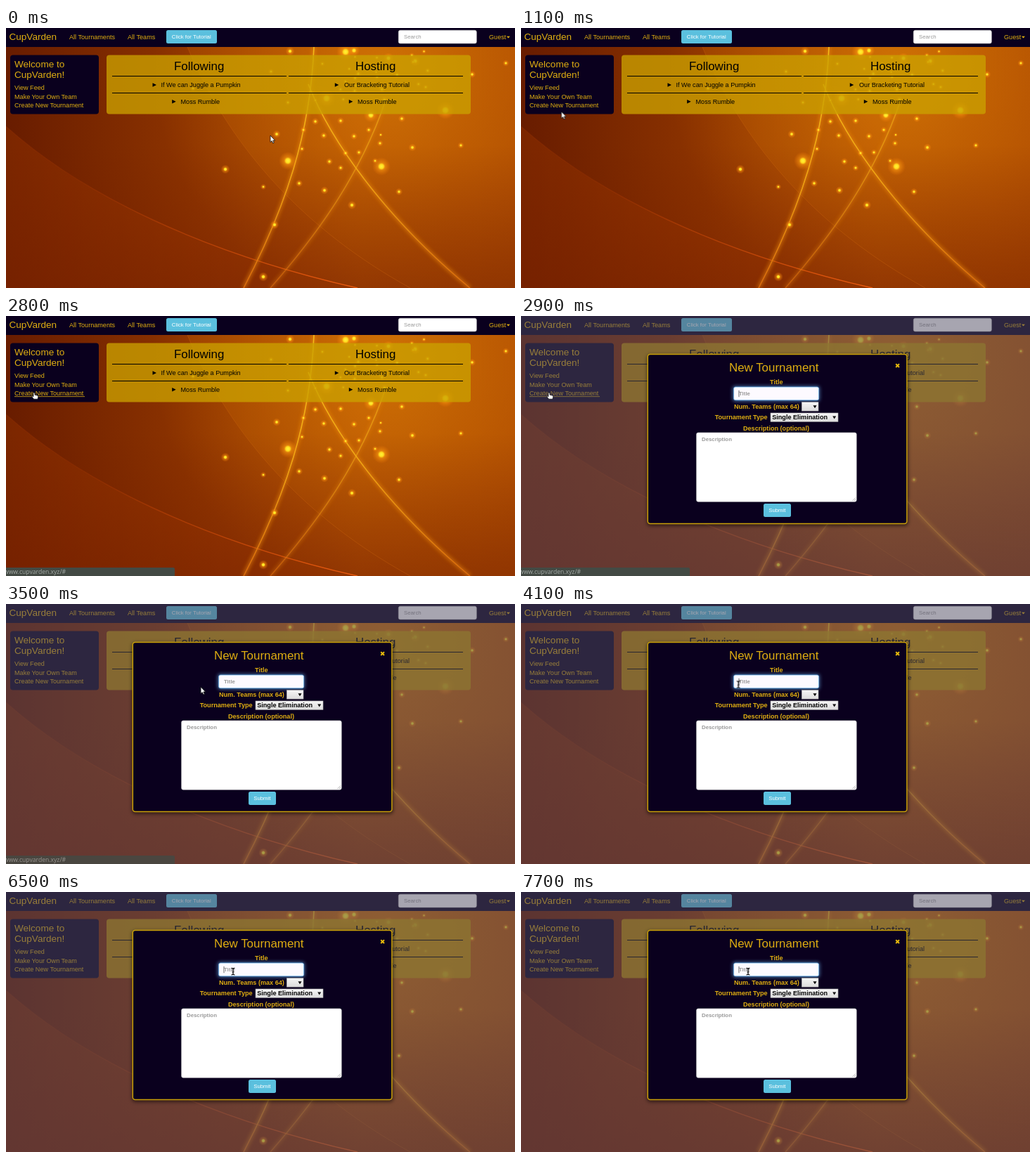
Recreate the animation shown at these times as an HTML page. Size 724x370 px, loop 8000 ms.

```html
<!DOCTYPE html>
<html lang="en">
<head>
<meta charset="utf-8">
<title>Tournament page</title>
<style>
html, body { margin: 0; width: 100%; height: 100%; overflow: hidden; background: #0a001e; }
svg { display: block; width: 724px; height: 370px; }
text { font: 9.1px "Liberation Sans", Arial, sans-serif; white-space: pre; }
.gold { fill: #dfae12; }
.navy { fill: #0a001e; }
.brand { font-size: 13.55px; }
.head { font-size: 16.9px; }
.small { font-size: 7.8px; }
.bold text { font-weight: bold; }
.hint { fill: #999; }
.white { fill: #fff; }
.url { font: 8.6px "Open Sans", "Noto Sans", sans-serif; fill: #a6aca8; }

.anim { animation: 8s -20ms infinite step-end; }
#cursor { animation: travel 8s -20ms infinite ease-in-out; }
#arrow { animation-name: arrow; }
#hand, #underline { animation-name: hover; }
#beam { animation-name: beam; }
#status { animation-name: status; }
#modal { animation-name: modal; }
#caret { animation-name: caret; }

@keyframes travel {
  0%, 1.25% { transform: translate(376px, 153px); }
  13.75% { transform: translate(57.5px, 119px); }
  23.75%, 36.5% { transform: translate(40px, 109px); }
  43.75% { transform: translate(277px, 118px); }
  56.25%, 100% { transform: translate(323px, 113px); }
}
@keyframes arrow {
  0% { visibility: visible; }
  17.5% { visibility: hidden; }
  37.5% { visibility: visible; }
  50% { visibility: hidden; }
}
@keyframes hover {
  0% { visibility: hidden; }
  17.5% { visibility: visible; }
  37.5% { visibility: hidden; }
}
@keyframes beam {
  0% { visibility: hidden; }
  50% { visibility: visible; }
}
@keyframes status {
  0% { opacity: 0; }
  18.75% { opacity: 1; }
  43.75% { opacity: .8; }
  45% { opacity: 0; }
}
@keyframes modal {
  0% { visibility: hidden; }
  36.25% { visibility: visible; }
}
/* blinks every 600 ms once the field has focus */
@keyframes caret {
  0% { opacity: 0; }
  36.25% { opacity: 1; }
  43.75% { opacity: 0; }
  51.25% { opacity: 1; }
  58.75% { opacity: 0; }
  66.25% { opacity: 1; }
  73.75% { opacity: 0; }
  81.25% { opacity: 1; }
  88.75% { opacity: 0; }
  96.25% { opacity: 1; }
}
</style>
</head>
<body>
<svg viewBox="0 0 724 370">
  <defs>
    <linearGradient id="base">
      <stop offset="0" stop-color="#681c00"/>
      <stop offset=".35" stop-color="#8c3300"/>
      <stop offset=".7" stop-color="#b35004"/>
      <stop offset="1" stop-color="#ac4803"/>
    </linearGradient>
    <radialGradient id="warm" gradientUnits="userSpaceOnUse" cx="540" cy="60" r="330">
      <stop offset="0" stop-color="#dc8206" stop-opacity=".65"/>
      <stop offset="1" stop-color="#c86400" stop-opacity="0"/>
    </radialGradient>
    <linearGradient id="shade" x1="0" y1="0" x2="0" y2="1">
      <stop offset=".45" stop-color="#701c00" stop-opacity="0"/>
      <stop offset="1" stop-color="#701c00" stop-opacity=".5"/>
    </linearGradient>
    <linearGradient id="beamLine" gradientUnits="userSpaceOnUse" x1="0" y1="27" x2="0" y2="370">
      <stop offset="0" stop-color="#f4bc18"/>
      <stop offset=".5" stop-color="#f0a814"/>
      <stop offset="1" stop-color="#d86a0c"/>
    </linearGradient>
    <linearGradient id="rim" gradientUnits="userSpaceOnUse" x1="0" y1="0" x2="500" y2="0">
      <stop offset=".2" stop-color="#d04808" stop-opacity=".1"/>
      <stop offset="1" stop-color="#ec5c10"/>
    </linearGradient>
    <radialGradient id="spark">
      <stop offset="0" stop-color="#fff23c"/>
      <stop offset=".24" stop-color="#ffdc1e"/>
      <stop offset=".42" stop-color="#ff9c10" stop-opacity=".55"/>
      <stop offset="1" stop-color="#ff8008" stop-opacity="0"/>
    </radialGradient>
    <linearGradient id="select" x1="0" y1="0" x2="0" y2="1">
      <stop offset="0" stop-color="#f6f6f6"/>
      <stop offset="1" stop-color="#dcdcdc"/>
    </linearGradient>
    <filter id="blur" x="-20%" y="-20%" width="140%" height="140%"><feGaussianBlur stdDeviation="2.5"/></filter>
    <g id="streaks">
      <path d="M438 27C433 150 398 255 338 370"/>
      <path d="M430 80C468 176 556 284 660 370"/>
      <path d="M541 100C506 205 446 290 376 370" opacity=".6"/>
    </g>
  </defs>

  <g id="backdrop">
    <rect width="724" height="370" fill="url(#base)"/>
    <path d="M0 140C110 238 280 320 500 370H0Z" fill="#a43c00" opacity=".32"/>
    <path d="M258 27C320 175 430 290 575 370H724V27Z" fill="#c06200" opacity=".25"/>
    <rect width="724" height="370" fill="url(#warm)"/>
    <path d="M430 80C468 176 556 284 660 370H376C446 290 506 205 541 100Z" fill="#d07808" opacity=".08"/>
    <rect width="724" height="370" fill="url(#shade)"/>
    <g fill="none">
      <path d="M0 140C110 238 280 320 500 370" stroke="url(#rim)" stroke-width="1.4"/>
      <path d="M258 27C320 175 430 290 575 370" stroke="#d46c10" stroke-width=".8" opacity=".4"/>
      <use href="#streaks" stroke="#f08c10" stroke-width="6" opacity=".45" filter="url(#blur)"/>
      <use href="#streaks" stroke="url(#beamLine)" stroke-width="1.6"/>
    </g>
    <g id="sparks" fill="url(#spark)"></g>
  </g>

  <rect class="navy" width="724" height="27"/>
  <g class="gold">
    <text class="brand" x="4.5" y="17">CupVarden</text>
    <text x="90" y="15.5">All Tournaments</text>
    <text x="173" y="15.5">All Teams</text>
    <text x="687" y="15.5">Guest</text>
    <path d="M712 11.8h5l-2.5 2.7Z"/>
  </g>
  <rect x="228" y="3" width="72" height="19" rx="2.5" fill="#5bc0de"/>
  <text class="small white" x="235.8" y="15.3">Click for Tutorial</text>
  <rect x="558.3" y="3.3" width="111" height="18.6" rx="2.5" fill="#fff" stroke="#ccc" stroke-width=".65"/>
  <text class="small hint" x="566" y="15.3">Search</text>

  <rect class="navy" x="6" y="38.5" width="126" height="84" rx="4"/>
  <g class="gold">
    <text class="brand" x="12" y="56">Welcome to</text>
    <text class="brand" x="12" y="70.7">CupVarden!</text>
    <text x="12" y="88.3">View Feed</text>
    <text x="12" y="100.8">Make Your Own Team</text>
    <text x="12" y="113.3">Create New Tournament</text>
    <rect id="underline" class="anim" x="12" y="114.3" width="100" height=".8"/>
  </g>

  <rect x="143" y="38.5" width="518" height="84" rx="4" fill="#cba000" opacity=".78"/>
  <text class="head" x="239" y="59.5">Following</text>
  <text class="head" x="497" y="59.5">Hosting</text>
  <path d="M151 68.5H399M402 68.5H650M151 92.5H399M402 92.5H650" stroke="#000"/>
  <text x="220.5" y="84">If We can Juggle a Pumpkin</text>
  <text x="248.5" y="107.8">Moss Rumble</text>
  <text x="481" y="84">Our Bracketing Tutorial</text>
  <text x="500" y="107.8">Moss Rumble</text>
  <path d="M208.5 78.3l5.5 2.7-5.5 2.7ZM236.2 102l5.5 2.7-5.5 2.7ZM467.8 78.3l5.5 2.7-5.5 2.7ZM487.8 102l5.5 2.7-5.5 2.7Z"/>

  <g id="modal" class="anim">
    <rect width="724" height="370" fill="#504c62" opacity=".5"/>
    <rect x="179" y="55" width="372" height="244" rx="5" opacity=".5" filter="url(#blur)"/>
    <rect class="navy" x="180.3" y="54.6" width="368.6" height="241" rx="3.5" stroke="#c9a008" stroke-width="1.5"/>
    <text class="head gold" x="296" y="79.3">New Tournament</text>
    <path d="M533.2 68.2l4.8 4.8M538 68.2l-4.8 4.8" stroke="#e8b80c" stroke-width="2"/>
    <g class="gold bold">
      <text x="354" y="97.3">Title</text>
      <text x="303" y="132">Num. Teams (max 64)</text>
      <text x="275.7" y="147.3">Tournament Type</text>
      <text x="316" y="162.6">Description (optional)</text>
    </g>
    <rect x="301" y="99.5" width="124" height="22" rx="4" fill="#66afe9" opacity=".6" filter="url(#blur)"/>
    <rect x="302.6" y="101" width="121" height="18.8" rx="2.5" fill="#fdfaff" stroke="#66afe9" stroke-width=".8"/>
    <g fill="url(#select)" stroke="#a9a9a9" stroke-width=".6">
      <rect x="399.3" y="122.7" width="23.7" height="12.4"/>
      <rect x="355" y="138" width="96" height="12.4"/>
    </g>
    <path d="M415.5 127.3h5l-2.5 4ZM443.2 142.4h5l-2.5 4Z"/>
    <rect x="249.6" y="166" width="227.6" height="98.3" rx="2.5" fill="#fff" stroke="#ccc" stroke-width=".65"/>
    <path d="M471.5 263l4.5-4.5M474 263l2-2" stroke="#888" stroke-width=".6"/>
    <g class="bold">
      <text x="357.2" y="147.3">Single Elimination</text>
      <text class="small hint" x="310" y="113.3">Title</text>
      <text class="small hint" x="257" y="178.2">Description</text>
    </g>
    <rect id="caret" class="anim" x="309.6" y="105.8" width=".8" height="9.4" fill="#444"/>
    <rect x="345" y="267" width="39" height="19" rx="2.5" fill="#5bc0de"/>
    <text class="small white" x="352.2" y="279.3">Submit</text>
  </g>

  <g id="status" class="anim">
    <path d="M0 358H238q2 0 2 2V370H0Z" fill="#434a44"/>
    <text class="url" x="-3" y="367.2">www.cupvarden.xyz/#</text>
  </g>

  <g id="cursor">
    <path id="arrow" class="anim" d="M0 0V9.5L2.2 7.6 3.7 11 5.3 10.3 3.8 7H6.6Z" fill="#fff" stroke="#111" stroke-width=".8"/>
    <path id="hand" class="anim" d="M-1 .5Q0-.6 1 .5V3.2L5 4.2Q6 4.6 5.8 6L5 9.2H-.4L-3 6Q-3.4 4.8-2.4 4.8L-1 5.8Z" fill="#fff" stroke="#111" stroke-width=".7"/>
    <path id="beam" class="anim" d="M-2.4-4.6Q-.4-4.6 0-3.6.4-4.6 2.4-4.6M0-3.6V3.8M-2.4 4.8Q-.4 4.8 0 3.8.4 4.8 2.4 4.8M-1.5 1H1.5" fill="none" stroke="#111" stroke-width="1.2"/>
  </g>
</svg>
<script>
const sparks = document.getElementById('sparks');

function addSpark(x, y, size) {
  const dot = document.createElementNS(sparks.namespaceURI, 'circle');
  const place = { cx: x, cy: y, r: size * 2.6 };
  for (const key in place) dot.setAttribute(key, place[key]);
  sparks.append(dot);
}

// x, y, size
[
  [401, 189, 5], [534, 197, 5], [519, 124, 4], [625, 117, 5], [483, 34, 5], [456, 100, 5],
  [312, 201, 2.5], [366, 226, 1.6], [417, 221, 2], [453, 231, 2.2], [559, 233, 2], [492, 252, 2.4],
  [382, 280, 2.4], [366, 354, 2.6], [578, 170, 2.2], [647, 167, 1.8], [563, 129, 2], [385, 151, 2.2],
  [440, 133, 2], [423, 145, 1.7], [452, 153, 2], [476, 132, 2], [495, 154, 2], [516, 145, 1.8],
  [532, 164, 1.8], [533, 152, 1.2], [460, 190, 2], [476, 199, 1.8], [483, 178, 1.8], [502, 177, 1.8],
  [525, 189, 1.6], [421, 172, 1.6], [404, 33, 2.5], [495, 32, 3.2], [544, 43, 3], [582, 47, 3],
  [663, 66, 2], [711, 50, 1.8], [377, 62, 1.6], [401, 106, 1.6], [266, 86, 1.6], [501, 65, 2]
].forEach(spark => addSpark(...spark));

let seed = 7;
const random = () => (seed = seed * 16807 % 2147483647) / 2147483647;
for (let i = 0; i < 26; i++) addSpark(440 + random() * 170, 29 + random() * 80, 0.9 + random() * 1.1);
</script>
</body>
</html>
```
